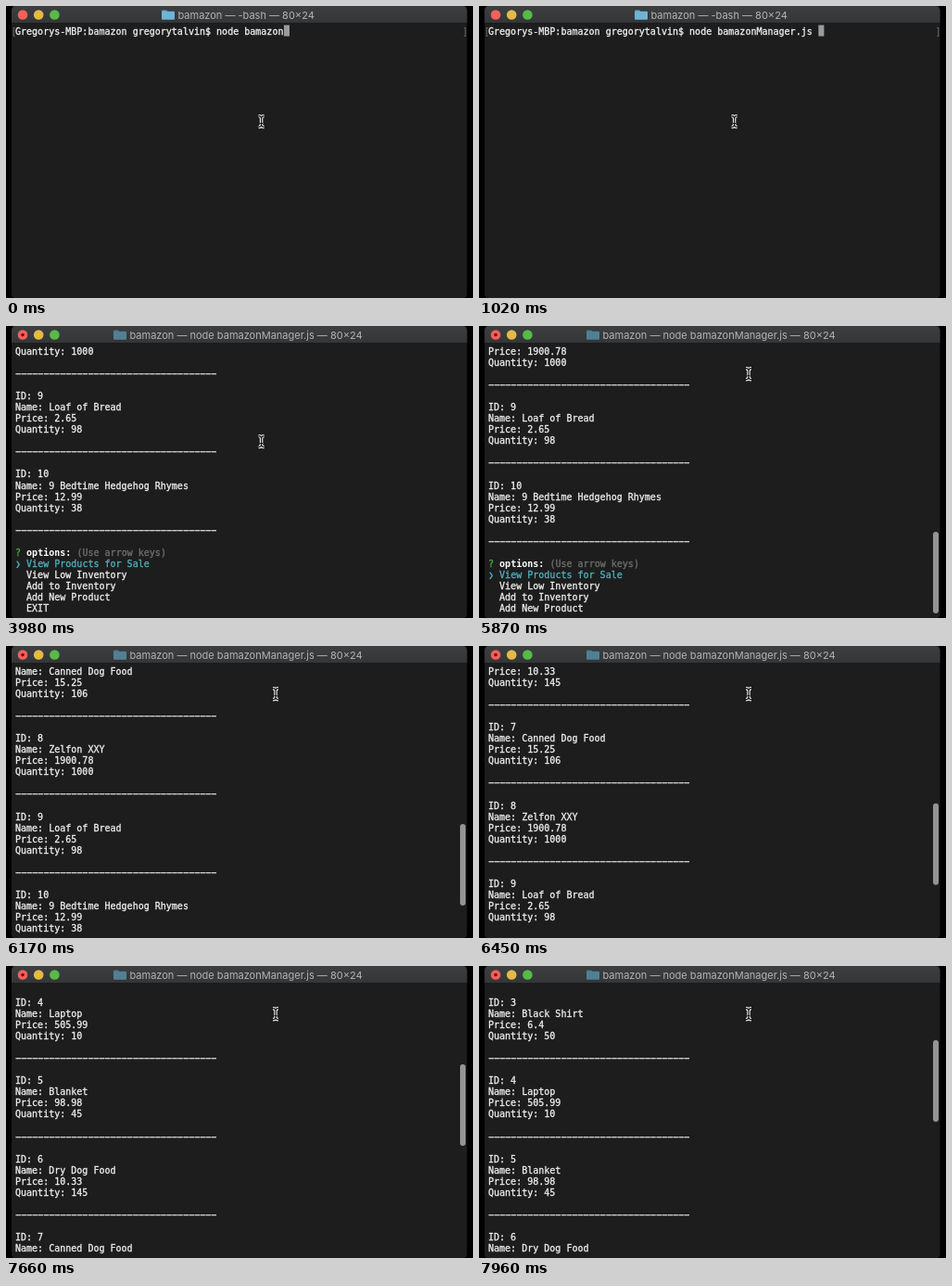
Write an HTML page with a canvas that moves like this. It is 504 px wide and 315 px high and loops after 8000 ms.

```html
<!DOCTYPE html>
<html lang="en">
<head>
<meta charset="utf-8">
<style>
html, body { margin: 0; height: 100%; overflow: hidden; background: #000; }
canvas { display: block; }
</style>
</head>
<body>
<canvas id="stage" width="504" height="315"></canvas>
<script>
const ctx = document.getElementById('stage').getContext('2d');
const LOOP = 8000, COL = 6.04, ROW = 12.08, ROWS = 24;
const WHITE = '#f0f0f0', CYAN = '#4fb3bf', GREEN = '#45b03c', GRAY = '#707070';
const MONO = '10.03px "DejaVu Sans Mono", monospace';

const products = [
  ['Black Shirt', 6.4, 50], ['Laptop', 505.99, 10], ['Blanket', 98.98, 45],
  ['Dry Dog Food', 10.33, 145], ['Canned Dog Food', 15.25, 106],
  ['Zelfon XXY', 1900.78, 1000], ['Loaf of Bread', 2.65, 98],
  ['9 Bedtime Hedgehog Rhymes', 12.99, 38],
];
// A line is a string or a list of [column, text, colour, weight] runs.
const menu = [
  [[0, '?', GREEN], [2, 'options:', '#fff', 'bold'], [11, '(Use arrow keys)', GRAY]],
  [[0, '❯', CYAN, 'bold'], [2, 'View Products for Sale', CYAN]],
  '  View Low Inventory', '  Add to Inventory', '  Add New Product', '  EXIT',
];
const listing = [''];
products.forEach(([name, price, quantity], i) => listing.push(
  `ID: ${i + 3}`, `Name: ${name}`, `Price: ${price}`, `Quantity: ${quantity}`,
  '', '−'.repeat(36), ''));
listing.push(...menu);

const prompt = 'Gregorys-MBP:bamazon gregorytalvin$ node bamazon';
const typing = [[0, ''], [570, 'M'], [870, 'Ma'], [1020, 'Manager.js ']];
const pointer = [[0, [275.6, 124.6]], [5300, [277, 101]], [5450, [304, 21]], [5590, [291, 51.7]]];
const scrolling = [[0, 0], [5870, 1], [6020, 4], [6170, 9], [6300, 12], [6450, 15], [6600, 20],
  [6750, 24], [7350, 26], [7500, 28], [7660, 32], [7810, 36], [7960, 39]];

const valueAt = (steps, t) => steps.findLast(([start]) => start <= t)[1];

function box(x, y, w, h, radius, color) {
  ctx.fillStyle = color;
  ctx.beginPath();
  ctx.roundRect(x, y, w, h, radius);
  ctx.fill();
}

function disc(x, y, r, color) {
  ctx.fillStyle = color;
  ctx.beginPath();
  ctx.arc(x, y, r, 0, 7);
  ctx.fill();
}

function text(str, x, y, color, font) {
  ctx.font = font;
  ctx.fillStyle = color;
  ctx.fillText(str, x, y);
}

// Medium weight: a thin outline thickens the regular face.
function drawRun(str, col, row, color, weight = 'normal') {
  const x = 10 + col * COL, y = 30.6 + row * ROW;
  text(str, x, y, color, `${weight} ${MONO}`);
  if (weight === 'bold') return;
  ctx.lineWidth = 0.3;
  ctx.strokeStyle = color;
  ctx.strokeText(str, x, y);
}

function drawLine(line, row) {
  const runs = typeof line === 'string' ? [[0, line, WHITE]] : line;
  for (const [col, str, color, weight] of runs) drawRun(str, col, row, color, weight);
}

function drawCaret(col, row) {
  box(10 + col * COL, 20.6 + row * ROW, COL, 12, 0, '#9b9b9b');
}

function drawWindow(running) {
  box(6, -1, 491.5, 316, [5, 5, 4, 4], '#1d1d1d');
  const bar = ctx.createLinearGradient(0, 0, 0, 18);
  bar.addColorStop(0, '#3c3e40');
  bar.addColorStop(1, '#343638');
  box(6, 0, 491.5, 18, [5, 5, 0, 0], bar);
  ['#f5605a', '#e2bb45', '#58ba46'].forEach((color, i) => disc(18 + i * 17.2, 9.5, 5.3, color));
  if (running) disc(18, 9.6, 1.8, '#720d09');

  const x = running ? 116 : 168;
  box(x, 4.5, 6, 4, 1, running ? '#4a7488' : '#5fa3c6');
  box(x, 5.8, 14, 9, 1, running ? '#517f94' : '#6fb4d6');
  text(`bamazon — ${running ? 'node bamazonManager.js' : '-bash'} — 80×24`,
    x + 17.5, 13.5, '#b4b4b4', '11px Inter, sans-serif');
}

function drawPointer([x, y]) {
  const beam = new Path2D(
    `M${x - 3} ${y - 6}Q${x} ${y - 6} ${x} ${y - 3.5}V${y + 3.5}Q${x} ${y + 6} ${x - 3} ${y + 6}` +
    `M${x + 3} ${y - 6}Q${x} ${y - 6} ${x} ${y - 3.5}M${x} ${y + 3.5}Q${x} ${y + 6} ${x + 3} ${y + 6}` +
    `M${x - 1.5} ${y + 2}H${x + 1.5}`);
  for (const [width, color] of [[3.4, '#f4f4f4'], [1.2, '#151515']]) {
    ctx.lineWidth = width;
    ctx.strokeStyle = color;
    ctx.stroke(beam);
  }
}

function drawPrompt(t) {
  const command = prompt + valueAt(typing, t);
  drawLine(command, 0);
  text('[', 5.5, 30.6, GRAY, MONO);
  text(']', 492.5, 30.6, GRAY, MONO);
  if (t < 1760) drawCaret(command.length, 0);
  else if (t < 2210) drawCaret(0, 1);
  else menu.forEach((line, i) => drawLine(line, i + 1));
}

function drawListing(t) {
  const offset = valueAt(scrolling, t);
  const top = listing.length - ROWS - offset;
  listing.slice(top, top + ROWS).forEach(drawLine);
  if (offset) box(490, 225.7 - 3.737 * offset, 6, 88, 3, '#949494');
}

function frame(now) {
  const t = now % LOOP;
  ctx.clearRect(0, 0, 504, 315);
  drawWindow(t >= 1920);
  if (t < 3980) drawPrompt(t);
  else drawListing(t);
  drawPointer(valueAt(pointer, t));
  requestAnimationFrame(frame);
}
requestAnimationFrame(frame);
</script>
</body>
</html>
```
